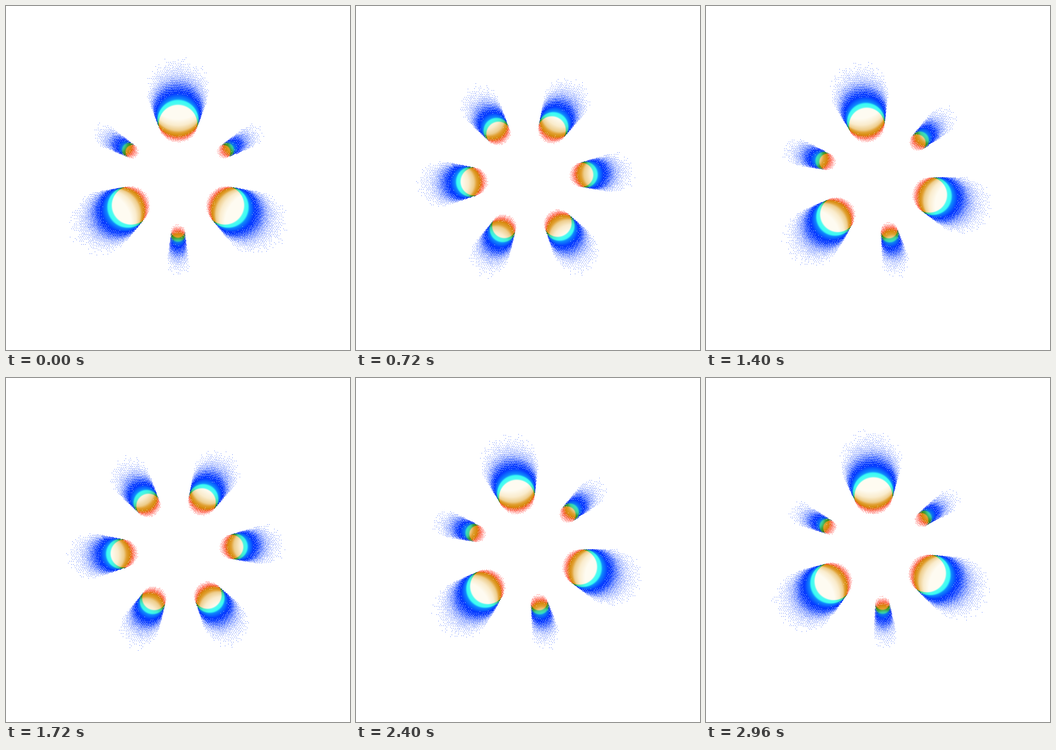
Animation of 748x748 px, one loop 3 s. Source, as an HTML page with a canvas:

```html
<!DOCTYPE html>
<html>
<head>
<meta charset="utf-8">
<style>
html, body { margin: 0; width: 100%; height: 100%; overflow: hidden; background: #fff; }
canvas { display: block; }
</style>
</head>
<body>
<canvas id="stage" width="748" height="748"></canvas>
<script>
const SIZE = 748, CX = 373.5, CY = 374;
const K_MAX = 1.68, FRAME = 40, LOOP = 3000;
const ctx = document.getElementById('stage').getContext('2d');
const image = ctx.createImageData(SIZE, SIZE);
const pixels = new Uint32Array(image.data.buffer);

// Base colour by the highest layer over a pixel: [scale, r, g, b]
const WARM = [
  [1, 255, 60, 60], [1.12, 255, 75, 50], [1.22, 215, 140, 15], [1.29, 225, 160, 50],
  [1.36, 238, 205, 140], [1.5, 250, 236, 205], [1.7, 255, 253, 245]
];
// Tint by the lowest layer over a pixel: [scale, red factor, green factor, pull to full blue]
const COOL = [
  [0.985, 1, 1, 0], [1.005, 0.32, 1, 0], [1.05, 0.22, 1, 0.2],
  [1.075, 0.06, 0.55, 0.8], [1.15, 0.03, 0.24, 1]
];

function sample(stops, k) {
  const end = stops.findIndex(s => s[0] > k);
  if (end === 0) return stops[0].slice(1);
  if (end < 0) return stops[stops.length - 1].slice(1);
  const a = stops[end - 1], b = stops[end];
  const f = (k - a[0]) / (b[0] - a[0]);
  return [1, 2, 3].map(n => a[n] + (b[n] - a[n]) * f);
}

// Amount of points lying above scale k
const above = k => 2.7 / (1 + Math.exp(9 * (k - 1.13)));
const fract = v => v - Math.floor(v);

// Evenly spread dither threshold with a little irregularity
const threshold = new Float32Array(SIZE * SIZE);
for (let y = 0, i = 0; y < SIZE; y++) {
  for (let x = 0; x < SIZE; x++, i++) {
    const noise = fract(Math.sin(x * 12.9898 + y * 78.233) * 43758.5453);
    threshold[i] = fract(x * 0.7548777 + y * 0.5698403 + noise * 0.04);
  }
}

function colour(lo, hi) {
  const [r, g, b] = sample(WARM, hi);
  const [fr, fg, fb] = sample(COOL, lo);
  return (255 << 24 | (b + (255 - b) * fb) << 16 | (g * fg) << 8 | r * fr) >>> 0;
}

// A column is a stack of discs; perspective scales each one away from the centre
function drawColumn(angle) {
  const ux = Math.sin(angle), uy = -Math.cos(angle);
  const pulse = Math.cos(3 * angle);
  const dist = 116.75 + 1.75 * pulse;
  const radius = 28.5 + 10.5 * pulse + 3 * pulse ** 3;
  const near = dist - radius, far = (dist + radius) * K_MAX, side = radius * K_MAX;
  const mid = (near + far) / 2, reach = Math.hypot((far - near) / 2, side);
  const x0 = Math.floor(CX + ux * mid - reach), x1 = CX + ux * mid + reach;
  const y0 = Math.floor(CY + uy * mid - reach), y1 = CY + uy * mid + reach;

  for (let y = y0; y < y1; y++) {
    for (let x = x0; x < x1; x++) {
      const dx = x - CX, dy = y - CY;
      const d = dx * ux + dy * uy;
      if (d < near || d > far) continue;
      // Scales at which a disc edge crosses this pixel
      const sq = dx * dx + dy * dy, m = d * dist;
      const disc = m * m - sq * (dist * dist - radius * radius);
      if (disc <= 0) continue;
      const root = Math.sqrt(disc);
      const lo = sq / (m + root), hi = Math.min(K_MAX, sq / (m - root));
      if (hi <= 1 || lo >= hi) continue;
      const total = above(Math.max(1, lo)) - above(hi);
      const p = y * SIZE + x;
      if (1 - Math.exp(-total - 1.5 * total ** 3) > threshold[p]) pixels[p] = colour(lo, hi);
    }
  }
}

function draw(time) {
  pixels.fill(0xffffffff);
  const turn = time / 1000 * Math.PI * 2 / 3;
  for (let i = 0; i < 6; i++) drawColumn(turn + i * Math.PI / 3);
  ctx.putImageData(image, 0, 0);
}

const start = performance.now();
let shown = -1;
function tick() {
  const step = Math.floor((performance.now() - start) % LOOP / FRAME);
  if (step !== shown) draw((shown = step) * FRAME);
  requestAnimationFrame(tick);
}
tick();
</script>
</body>
</html>
```
